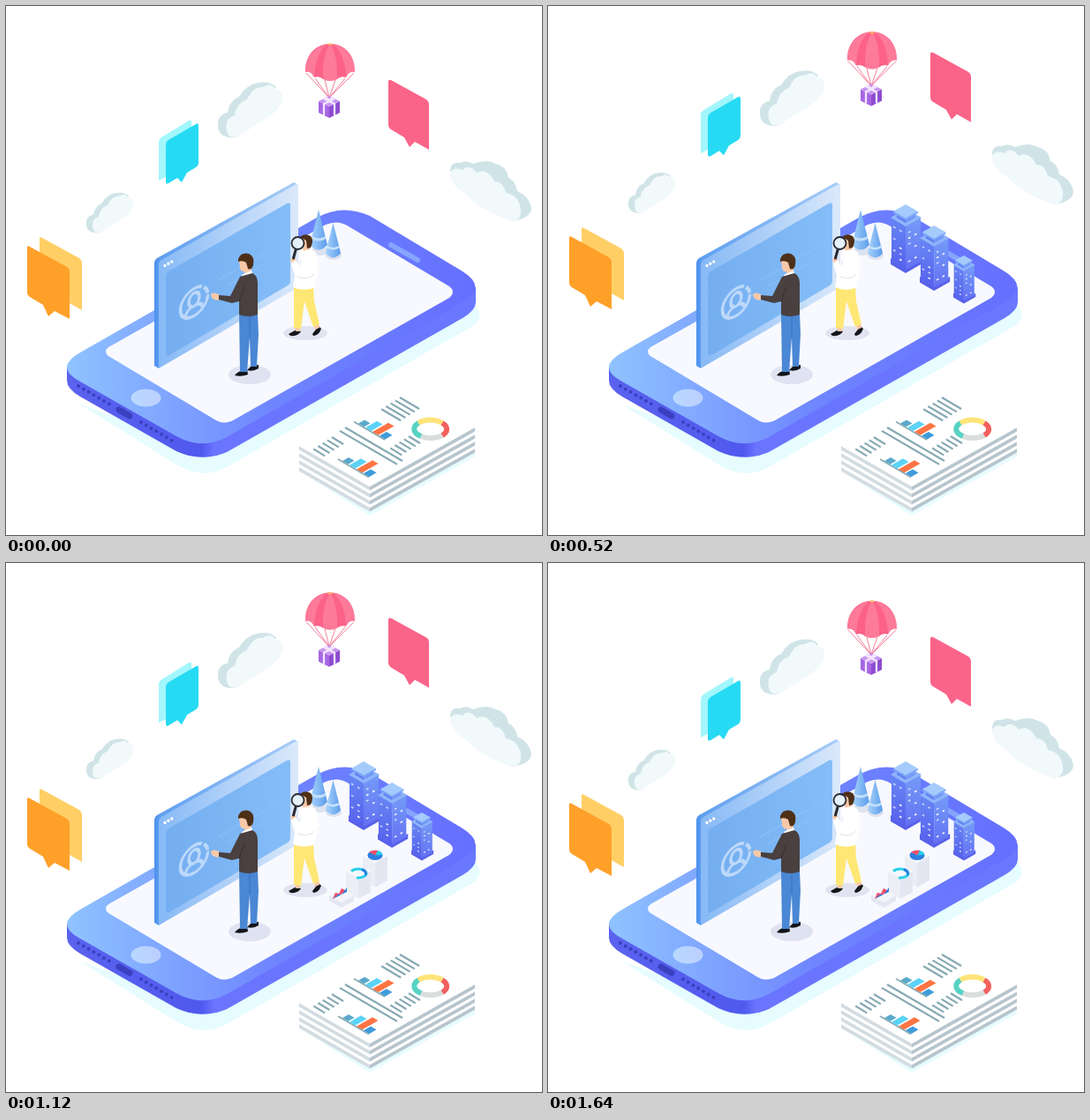
An HTML page that plays this animation: 607x600 px, repeating every 1680 ms.

```html
<!DOCTYPE html>
<html lang="en">
<head>
<meta charset="utf-8">
<title>Isometric phone scene</title>
<style>
html, body { margin: 0; width: 100%; height: 100%; overflow: hidden; background: #fff; }
svg { display: block; width: 607px; height: 600px; }
</style>
</head>
<body>
<svg viewBox="0 0 607 600">
<defs>
  <linearGradient id="phoneTop"><stop offset="0" stop-color="#8fc3ff"/><stop offset=".5" stop-color="#6f86ff"/><stop offset="1" stop-color="#656fff"/></linearGradient>
  <linearGradient id="phoneSide"><stop offset="0" stop-color="#5a62ee"/><stop offset=".33" stop-color="#5059ee"/><stop offset=".36" stop-color="#6a74ff"/><stop offset="1" stop-color="#6a78ff"/></linearGradient>
  <linearGradient id="edge"><stop offset="0" stop-color="#4c90ee"/><stop offset=".04" stop-color="#5f9ff0"/><stop offset="1" stop-color="#a9cdf8"/></linearGradient>
  <linearGradient id="frame"><stop offset="0" stop-color="#86b9f6"/><stop offset="1" stop-color="#dbe9fb"/></linearGradient>
  <linearGradient id="pane"><stop offset="0" stop-color="#74aef0"/><stop offset="1" stop-color="#84bdf8"/></linearGradient>
  <linearGradient id="home"><stop offset="0" stop-color="#b8d9ff"/><stop offset="1" stop-color="#bccfff"/></linearGradient>
  <linearGradient id="tree"><stop offset="0" stop-color="#a9d4fb"/><stop offset="1" stop-color="#5c9cec"/></linearGradient>
  <linearGradient id="wallL" x2="0" y2="1"><stop offset="0" stop-color="#6787f4"/><stop offset="1" stop-color="#5660ec"/></linearGradient>
  <linearGradient id="wallR" x2="0" y2="1"><stop offset="0" stop-color="#749cf7"/><stop offset="1" stop-color="#6470f3"/></linearGradient>
  <g id="cloud">
    <path fill="#d0e4e8" d="M240 136Q239 123 251 121Q253 107 264 103Q272 89 286 87Q299 85 306 92L262 148Q255 151 246 147Q240 143 240 136Z"/>
    <path fill="#f1f9fb" d="M250 141Q247 128 259 124Q261 110 273 106Q280 91 291 92Q301 86 305 95Q314 93 313 106Q310 118 297 126L264 147Q252 152 250 141Z"/>
  </g>
  <g id="tree1">
    <path fill="url(#tree)" d="M354 231L364 271Q354 282 344 271Z"/>
    <path fill="#c5e0fa" d="M346.500 261Q354 266 361.500 261L362 264Q354 269 346 264Z"/>
  </g>
  <g id="tower">
    <path fill="#5961ea" d="M388 286V293L405 303L424 292V286L405 297Z"/>
    <path fill="url(#wallL)" d="M389 240L405 250V299L389 290Z"/>
    <path fill="url(#wallR)" d="M405 250L422 240V290L405 299Z"/>
    <path fill="#8fb5fa" d="M388 240L405 230L423 240L405 250Z"/>
    <path fill="#5f80f2" d="M395 234V240L405 246V238Z"/>
    <path fill="#7397f6" d="M405 238V246L416 240V234Z"/>
    <path fill="#a4cbfc" d="M391 233L405 225L419 233L405 241Z"/>
    <path fill="#7da6f7" d="M391 233L405 241L419 233V235L405 243L391 235Z"/>
    <g id="windows" stroke="#fff" stroke-width="1.700"></g>
  </g>
  <g id="podium">
    <path fill="#eceef6" d="M0 8L14 16V44L0 36Z"/>
    <path fill="#e4e7f1" d="M14 16L28 8V36L14 44Z"/>
    <path fill="#f7f8fd" d="M0 8L14 0L28 8L14 16Z"/>
  </g>
</defs>

<!-- phone -->
<path fill="#e6fcff" d="M84 452L193 520Q222 538 250 523L530 362Q542 352 532 340L222 500Z"/>
<path fill="url(#phoneSide)" d="M69 410V425Q69 434 84 443L193 505Q222 518 250 506L517 354Q532 345 532 336V319Z"/>
<path fill="url(#phoneTop)" d="M84 393L352 240Q381 224 412 238L517 301Q546 319 517 336L250 489Q222 504 193 488L84 426Q54 410 84 393Z"/>
<path fill="#f8f9ff" d="M116 387L362 248Q376 242 388 250L502 318Q510 324 502 331L257 470Q247 475 238 470L116 397Q110 392 116 387Z"/>
<path stroke="#86a5ff" stroke-width="6" stroke-linecap="round" d="M436 271L466 288"/>
<ellipse cx="158.500" cy="444.500" rx="17" ry="10" fill="url(#home)"/>
<g stroke="#3a40c0" stroke-linecap="round" fill="none">
  <path stroke-width="4" stroke-dasharray="0 6.700" d="M82 431L118 452M153 472L188 493"/>
  <path stroke-width="7" d="M128 458L140 465"/>
</g>

<!-- trees -->
<g fill="#dde2ef"><ellipse cx="356" cy="278" rx="10" ry="5"/><ellipse cx="371" cy="283" rx="9" ry="5"/></g>
<use href="#tree1"/>
<use href="#tree1" transform="translate(370.500 246) scale(.86) translate(-354 -231)"/>

<!-- window panel -->
<path fill="url(#edge)" d="M168 291Q168 288 171 286L326 200L331 203L173 411L168 408Z"/>
<path fill="url(#frame)" d="M173 294Q173 290 176 288L327 203Q331 201 331 205V319L173 411Z"/>
<path fill="url(#pane)" d="M181 307Q181 303 184 301L318 224Q322 222 322 226V312Q322 315 319 317L185 396Q181 398 181 394Z"/>
<path stroke="#fff" stroke-width="3.400" stroke-linecap="round" stroke-dasharray="0 4.500" d="M180 294.500L188.500 289.500"/>
<path stroke="#8fc0f8" d="M240 311L308 272M250 318L300 289"/>
<g fill="none" stroke="#bcd8fa" stroke-width="3.500" transform="translate(213 336) skewY(-30)">
  <circle r="15.500" stroke-dasharray="82 3 10 2.400"/>
  <ellipse cy="-3" rx="6" ry="7.500"/>
  <path d="M-10 12Q-9 5-3 4M3 4Q9 5 10 12"/>
</g>

<!-- person with magnifier -->
<ellipse cx="339" cy="371" rx="25" ry="8" fill="#e1e4f0"/>
<path fill="#15161a" d="M320 372L329 367L334 369Q331 375 322 374ZM347 372L354 363L357 366Q354 374 348 374Z"/>
<path fill="#f8c9a8" d="M327 362H333V369H328ZM349 361L354 360L355 365L350 367Z"/>
<path fill="#ffe774" d="M326 317H348L349 335L355 361L348 364L338 335L334 366L326 365Z"/>
<path fill="#f8c9a8" d="M335 264Q336 259 343 261L346 270L343 279H338L334 273ZM322 287L327 285L330 291L325 294Z"/>
<path fill="#4e2f18" d="M333 262Q338 257 345 261Q349 266 345 274L341 275L340 266Z"/>
<path fill="#fff" d="M334 279Q346 273 351 280Q356 293 352 307L348 320Q336 324 325 319L327 306L323 292L328 288L332 294Z"/>
<path fill="none" stroke="#e0e3ec" d="M332 294L334 288M330 307Q342 312 349 304"/>
<circle cx="330.500" cy="269" r="7" fill="#e5f2fb" fill-opacity=".85" stroke="#292b33" stroke-width="1.800"/>
<path stroke="#292b33" stroke-width="3" stroke-linecap="round" d="M328 277L325.500 286"/>

<!-- person touching the panel -->
<ellipse cx="276" cy="418" rx="24" ry="11" fill="#dfe3f1"/>
<path fill="#121419" d="M259 419Q262 414 273 412L274 418Q266 421 259 419ZM273 413L278 408L286 407V411Q280 415 273 413Z"/>
<path fill="#4a87d4" d="M264 349H285L286 372L284 409H277L276 376L273 415H265Z"/>
<path stroke="#3872bd" d="M276 352V376"/>
<path fill="#f8c9a8" d="M264 289L265 297Q266 302 270 301V306H278V292L270 287ZM241 327Q235 324 232 327L233 331Q237 335 242 333Z"/>
<path fill="#4e2f18" d="M263 287Q266 279 275 281Q282 284 280 294Q278 300 274 298L272 291Q268 288 263 290Z"/>
<path fill="#fff" d="M267 305L278 300L280 306L268 309Z"/>
<path fill="#49403f" d="M265 307L279 303Q285 306 285 314V350Q274 354 264 350V335L256 337L241 333V328L254 329Z"/>
<path fill="none" stroke="#35302f" d="M264 335L270 318"/>

<!-- paper stack -->
<path fill="#e8fcff" d="M336 530L412 578L531 511V505L412 570Z"/>
<g id="sheets"></g>
<g id="report" stroke="#86a9b3" stroke-width="2.200"></g>
<g fill="none" stroke-width="6">
  <path stroke="#ffe47a" d="M467 473A18 10 0 0 1 494 473"/>
  <path stroke="#f2605e" d="M494 473A18 10 0 0 1 494 487"/>
  <path stroke="#d9dddd" d="M494 487A18 10 0 0 1 470 488"/>
  <path stroke="#56d2c3" d="M470 488A18 10 0 0 1 467 473"/>
</g>

<!-- parts that fade in -->
<g id="city">
  <use href="#tower"/>
  <use href="#tower" transform="translate(421 249) scale(.95) translate(-388 -225)"/>
  <use href="#tower" transform="translate(459 283) scale(.7) translate(-388 -225)"/>
</g>
<g id="charts">
  <use href="#podium" x="404" y="324"/>
  <use href="#podium" transform="translate(385 343) scale(1 .85)"/>
  <path fill="#e4e7f1" d="M366 377L380 385L394 377V383L380 391L366 383Z"/>
  <path fill="#f4f5fb" d="M366 377L380 369L394 377L380 385Z"/>
  <ellipse cx="418" cy="331.500" rx="8.500" ry="5.500" fill="#2c7fe0"/>
  <path fill="#27cfe8" d="M418 331.500L421 326Q426 328 426 331Z"/>
  <path fill="#ef4f6b" d="M418 331.500L411 328Q416 325 421 326Z"/>
  <ellipse cx="399" cy="352" rx="9" ry="5" fill="none" stroke="#27cfe8" stroke-width="3" stroke-dasharray="13 12 40"/>
  <path fill="none" stroke="#2c7fe0" stroke-width="3" d="M403 347.500Q409 350 407 354"/>
  <path fill="#ef4f6b" d="M370 381L373 374L377 375L380 369L386 372Z"/>
  <path fill="#2c7fe0" d="M370 381L376 376L380 376L384 371L386 368V373Z"/>
</g>

<!-- floating parts -->
<g id="orange">
  <path fill="#ffcf66" d="M38 264Q38 261 41 263L83 286Q86 288 86 291V345L38 318Z"/>
  <path fill="#ffa029" d="M24 274Q24 271 27 273L69 296Q72 298 72 301V355L55 346L48 352L42 339L27 330Q24 328 24 325Z"/>
</g>
<g id="cyan">
  <path fill="#a2f6fc" d="M173 154Q173 151 176 149L207 130Q210 128 210 132V178L173 198Z"/>
  <path fill="#27daf4" d="M181 158Q181 154 184 152L215 134Q218 132 218 136V178Q218 181 215 183L205 189L199 200L194 195L184 201Q181 203 181 199Z"/>
</g>
<g id="smallCloud"><use href="#cloud" transform="translate(91 212) scale(.73) translate(-240 -87)"/></g>
<g id="midCloud"><use href="#cloud"/></g>
<g id="pink"><path fill="#fb6489" d="M433 86Q433 83 436 84L476 106Q479 108 479 111V163L463 154L457 160L451 149L436 140Q433 138 433 135Z"/></g>
<g id="bigCloud">
  <path fill="#d0e4e8" d="M503 188Q503 176 514 178Q521 174 529 179Q544 173 555 179Q567 182 569 195Q577 198 579 210Q592 215 595 229Q595 241 573 244L520 198Z"/>
  <path fill="#f1f9fb" d="M503 192Q504 181 517 186Q524 178 533 189Q545 183 553 199Q563 199 566 212Q580 214 583 230Q584 246 570 243Q538 232 521 214Q503 202 503 192Z"/>
</g>
<g id="parachute">
  <path fill="none" stroke="#f4708f" stroke-width=".9" d="M340 76L366 104L394 76M350 82L366 104L384 82M361 84L366 104L373 84"/>
  <path fill="#fc6188" d="M339 75C338 32 396 32 395 75Q389 73 385 81Q379 79 375 83Q367 87 359 83Q355 79 349 81Q345 73 339 75Z"/>
  <path fill="#ff8ba6" opacity=".6" d="M364 43Q350 54 349 81Q345 73 339 75Q339 49 364 43ZM370 43Q384 54 385 81Q389 73 395 75Q395 49 370 43ZM367 43Q376 56 375 83Q367 87 359 83Q358 56 367 43Z"/>
  <path fill="#ffb067" d="M363 43.500Q367 41.500 371 43.500L367 45Z"/>
  <path fill="#a667e2" d="M354 108L366 114V127L354 121Z"/>
  <path fill="#8e4bd0" d="M366 114L378 108V121L366 127Z"/>
  <path fill="#c797f2" d="M354 108L366 102L378 108L366 114Z"/>
  <path fill="none" stroke="#f3e6ff" stroke-width="2.300" d="M360 124V111L372 105M372 124V111L360 105M366 107L361 103M366 107L371 103"/>
</g>
</svg>
<script>
const el = id => document.getElementById(id);
const lines = (x, y, dx, dy, count, gap = 5.2) => Array.from({ length: count }, (_, i) =>
  `<path d="M${x - i * gap} ${y + i * gap * .64}l${dx} ${dy}"/>`).join('');
const bar = (x, y, len, color) =>
  `<path fill="${color}" stroke="none" d="M${x} ${y}l${len} ${-len * .57}l6.500 3.800l${-len} ${len * .57}z"/>`;
const barChart = (x, y) => `<path stroke-width="1.500" d="M${x - 5} ${y - 2}l35 20.500"/>` +
  bar(x, y, 7, '#5aa9cb') + bar(x + 8, y + 4.700, 13, '#5bd3f6') +
  bar(x + 16, y + 9.400, 18, '#ff7443') + bar(x + 24, y + 14.100, 8, '#3f9bd9');

for (let i = 3; i >= 0; i--) {
  const y = i * 8;
  el('sheets').innerHTML += `<path fill="#d3dce1" d="M332 ${499 + y}L412 ${545 + y}v4.500L332 ${503.5 + y}z"/>
    <path fill="#b7c5cd" d="M412 ${545 + y}L531 ${478 + y}v4.500L412 ${549.5 + y}z"/>
    <path fill="#fff" d="M332 ${499 + y}L451 ${432 + y}L531 ${478 + y}L412 ${545 + y}z"/>`;
}
el('report').innerHTML = lines(446, 444, 22, 13, 5) + lines(384, 478, 65, 38, 2, 6) +
  lines(369, 489, 13, 8, 5) + lines(456, 488, 13, 8, 5) + barChart(399, 473.5) + barChart(381, 516);

for (let row = 0; row < 6; row++) for (let col = 0; col < 4; col++) {
  if ((row * 5 + col * 3) % 4 === 1 || (row + col * 2) % 5 === 3) continue;
  const left = col < 2, x = left ? 391 + col * 7 : 408 + (col - 2) * 7;
  const y = 249 + row * 6.6 + (left ? (x - 389) * .58 : (422 - x) * .58);
  el('windows').innerHTML += `<path d="M${x} ${y}l2.500 ${left ? 1.5 : -1.5}" opacity="${row % 2 ? .9 : .65}"/>`;
}

const LOOP = 1680, STEP = 40;
const ramp = (t, from, to) => Math.min(1, Math.max(0, (t - from) / (to - from)));
const bounce = (t, start, peak, end) => ramp(t, start, peak) - ramp(t, peak, end);
const leftRise = t => bounce(t, 0, 440, 680) + bounce(t, 960, 1400, 1640);
const rightRise = t => bounce(t, 0, 440, 755) + bounce(t, 895, 1335, 1640);
const floats = [
  ['orange', leftRise, 16.5], ['cyan', leftRise, 46], ['smallCloud', leftRise, 34], ['midCloud', leftRise, 20],
  ['pink', rightRise, 42], ['parachute', rightRise, 18], ['bigCloud', rightRise, 25.5],
];
const move = (id, y) => el(id).setAttribute('transform', `translate(0 ${y})`);
const appear = (id, amount, drop) => {
  el(id).setAttribute('opacity', amount);
  move(id, (1 - amount) * drop);
};

function draw(now) {
  const t = Math.floor((now % LOOP) / STEP) * STEP;
  for (const [id, rise, height] of floats) move(id, -rise(t) * height);
  appear('city', ramp(t, 0, 440), 20);
  appear('charts', ramp(t, 680, 960), 8);
  requestAnimationFrame(draw);
}
draw(0);
</script>
</body>
</html>
```
